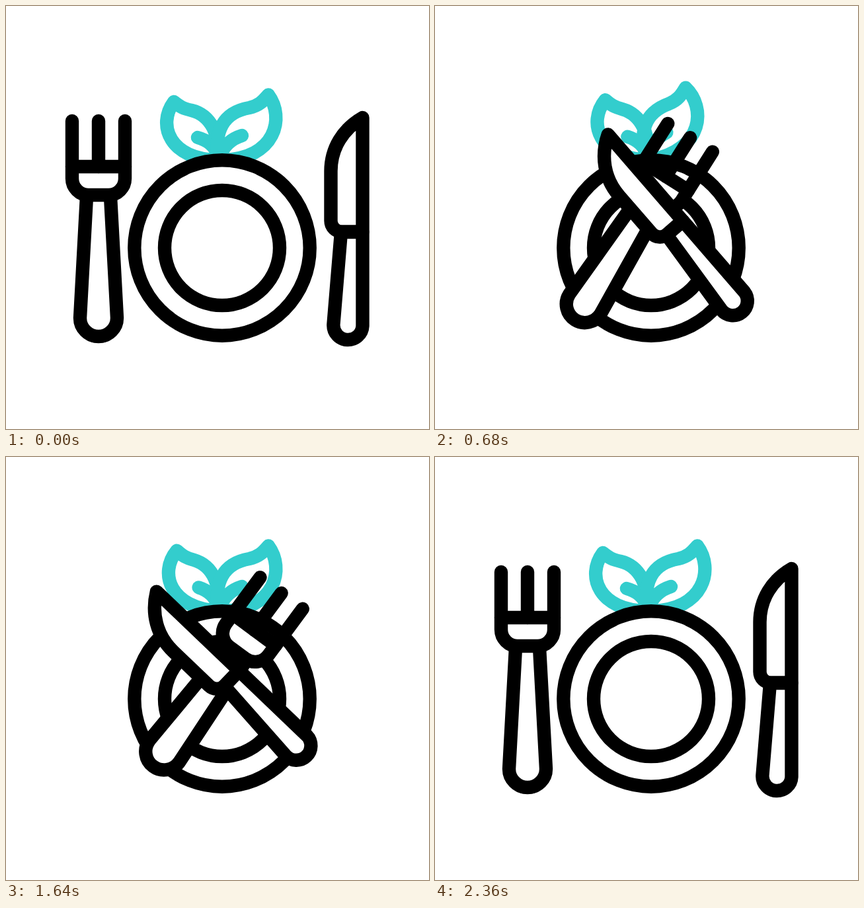
An HTML page that plays this animation: 640x640 px, repeating every 2.4 s.

```html
<!DOCTYPE html>
<html lang="en">
<head>
<meta charset="utf-8">
<title>Plate, fork and knife</title>
<style>
  html, body { margin: 0; height: 100%; overflow: hidden; background: #fff; }
  svg { display: block; width: 100vw; height: 100vh; }
  g { stroke-width: 20.4; stroke-linecap: round; stroke-linejoin: round; }
  .teal { stroke: #33cdcd; fill: none; }
  .black { stroke: #000; fill: #fff; }
  .open { fill: none; }
</style>
</head>
<body>
<svg viewBox="0 0 640 640">
  <g class="teal" id="rays"></g>
  <g class="teal">
    <path id="leftLeaf" d="M322 231C324 196 310 165 281 158C268 155 264 153 254 145C228 180 248 233 322 233M290 199C305 203 316 212 321 226"/>
    <path id="rightLeaf" d="M321 231C315 190 328 161 368 154C382 151 388 145 397 134.5C422 168 409 232 326 233M357 196C341 201 330 211 324 226"/>
  </g>
  <g class="black">
    <circle cx="327" cy="366" r="132.7"/>
    <circle cx="327" cy="366" r="87"/>
  </g>
  <g class="black" id="fork">
    <path d="M122 288L112 472A28 28 0 0 0 168 472L158 288"/>
    <path d="M100 243V261a25 25 0 0 0 25 25h30a25 25 0 0 0 25-25V243z"/>
    <path class="open" d="M100 174V243M140 174V243M180 174V243"/>
  </g>
  <g class="black" id="knife">
    <path d="M507 342L495.4 482A22 22 0 0 0 539.5 484V342z"/>
    <path d="M539.5 169C510 186 491.5 215 491.5 250V325a16.5 16.5 0 0 0 16.5 16.5H539.5z"/>
  </g>
</svg>
<script>
const LOOP = 2400;
const byId = id => document.getElementById(id);
const clamp = x => Math.min(1, Math.max(0, x));
const smooth = u => u * u * (3 - 2 * u);

// cubic-bezier(.78, 0, .22, 1), solved by bisection
function ease(x) {
  x = clamp(x);
  let lo = 0, hi = 1;
  for (let i = 0; i < 24; i++) {
    const s = (lo + hi) / 2, r = 1 - s;
    if (2.34 * s * r * r + 0.66 * s * s * r + s * s * s < x) lo = s; else hi = s;
  }
  return smooth(lo);
}

// Smooth interpolation through [time, value] pairs
function sway(keys, t) {
  const i = keys.findIndex(k => k[0] > t);
  if (i < 0) return keys[keys.length - 1][1];
  const [t0, a] = keys[i - 1], [t1, b] = keys[i];
  return a + (b - a) * smooth((t - t0) / (t1 - t0));
}

const leftKeys = [[0, 0], [320, -15.4], [920, 12], [1340, -6], [1740, 4.5], [2040, 0]];
const rightKeys = [[0, 0], [460, -30.5], [1000, 25.5], [1320, -12.5], [1820, 5.2], [2200, 0]];

const rays = [[110.5, 193.5], [162.5, 115.5], [239.5, 84], [492, 98.5], [561.5, 161.5], [581.5, 242]]
  .map(([x, y]) => {
    const line = document.createElementNS("http://www.w3.org/2000/svg", "path");
    byId("rays").append(line);
    const length = Math.hypot(x - 327, y - 366);
    return { line, x, y, dx: (x - 327) / length, dy: (y - 366) / length };
  });

function drawRays(t) {
  byId("rays").style.display = t > 720 && t < 1080 ? "" : "none";
  const head = 50 * (1 - ease((t - 700) / 280));
  const tail = 50 * (1 - ease((t - 740) / 320));
  for (const { line, x, y, dx, dy } of rays) {
    const point = d => `${x - dx * d} ${y - dy * d}`;
    line.setAttribute("d", `M${point(tail)}L${point(head)}`);
  }
}

function place(id, shift, angle, cx, cy) {
  byId(id).setAttribute("transform", `translate(${shift})rotate(${angle} ${cx} ${cy})`);
}

function draw(now) {
  const t = now % LOOP;
  const cross = t < 1200 ? ease(t / 1200) : 1 - ease((t - 1200) / 1160);
  place("fork", 214.5 * cross, 43.6 * cross, 140, 337);
  place("knife", -218 * cross, -55.2 * cross, 515.5, 337.5);
  place("leftLeaf", 0, sway(leftKeys, t), 322, 231);
  place("rightLeaf", 0, sway(rightKeys, t), 326, 231);
  drawRays(t);
}

const start = performance.now();
function tick() {
  draw(performance.now() - start);
  requestAnimationFrame(tick);
}
tick();
</script>
</body>
</html>
```
